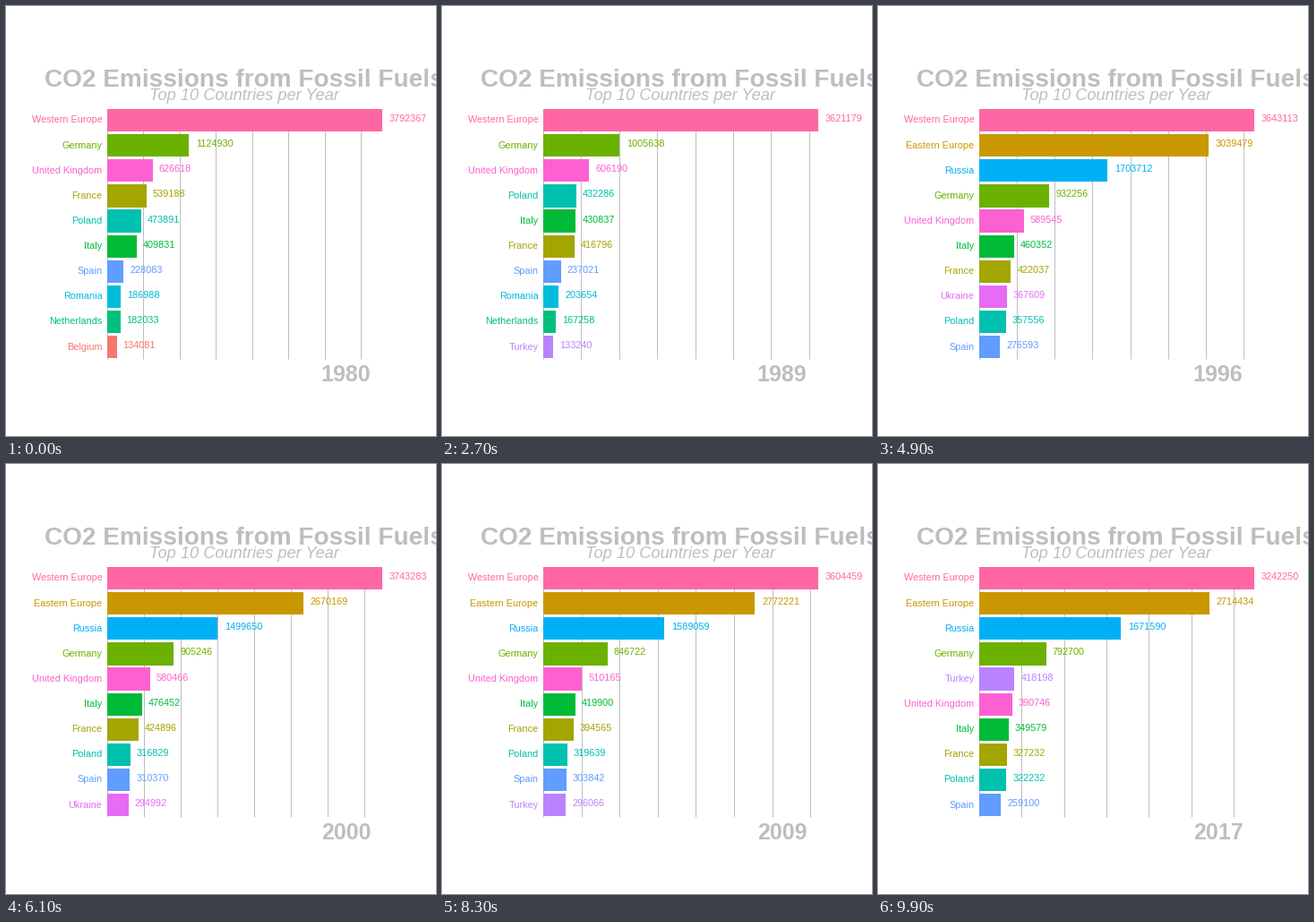
Recreate the animation shown at these times as a matplotlib script. Size 480 px wide and 480 px high, loop 10000 ms.

```python
import matplotlib.pyplot as plt
import numpy as np
from matplotlib.animation import FuncAnimation
from matplotlib.patches import Rectangle

SIZE, FRAMES, SHOWN = 480, 100, 10
LEFT, BAR_SPAN = 112.9, 307
TOP, PITCH, HALF = 127.52, 28.13, 12.65
GREY, LABEL = "#bebebe", 10.9
LEADER = "Western Europe"

# Turning points of each curve; a country joins in the first year it has
KEYS = {
    "Western Europe": {1980: 3792367, 1992.67: 3551373, 2005: 3860149,
                       2012.5: 3380730, 2017: 3242250},
    "Eastern Europe": {1992: 3440000, 2000.33: 2670075, 2005: 2801114, 2017: 2714434},
    "Russia": {1992: 1925000, 2000.33: 1499616, 2017: 1671590},
    "Germany": {1980: 1124930, 1992.67: 956994, 2017: 792700},
    "United Kingdom": {1980: 626618, 2005: 569874, 2017: 390746},
    "France": {1980: 539188, 1989: 416796, 2005: 428232, 2017: 327232},
    "Poland": {1980: 473891, 1989: 432286, 2000.33: 316828, 2017: 322232},
    "Italy": {1980: 409831, 1989: 430837, 2005: 495234, 2012: 363400, 2017: 349579},
    "Spain": {1980: 228083, 1992: 240000, 2001: 316000, 2005: 368964,
              2012: 255000, 2017: 259100},
    "Ukraine": {1992: 560000, 1994: 410000, 2000.33: 295000, 2012.5: 265020, 2017: 200000},
    "Turkey": {1980: 76000, 2005: 235000, 2017: 418198},
    "Romania": {1980: 186988, 1989: 203654, 1992: 125000},
    "Netherlands": {1980: 182033, 1989: 167258},
    "Belgium": {1980: 134081, 1989: 110000},
    "Czech Republic": {1990: 166000, 1992: 140000},
}


def hue_color(hue, chroma=100, light=65):
    """Polar LUV colour as sRGB."""
    angle = np.radians(hue)
    u = chroma * np.cos(angle) / (13 * light) + 0.1978
    v = chroma * np.sin(angle) / (13 * light) + 0.4683
    y = ((light + 16) / 116) ** 3
    x, z = y * 9 * u / (4 * v), y * (12 - 3 * u - 20 * v) / (4 * v)
    linear = np.clip([3.2406 * x - 1.5372 * y - 0.4986 * z,
                      -0.9689 * x + 1.8758 * y + 0.0415 * z,
                      0.0557 * x - 0.2040 * y + 1.0570 * z], 0, 1)
    return tuple(np.where(linear <= 0.0031308, 12.92 * linear,
                          np.clip(1.055 * linear ** (1 / 2.4) - 0.055, 0, 1)))


COLORS = {name: hue_color(15 + 360 * i / len(KEYS)) for i, name in enumerate(sorted(KEYS))}


def value(name, time):
    keys = KEYS[name]
    return np.interp(time, list(keys), list(keys.values()))


def ranking(year):
    known = [name for name in KEYS if year >= min(KEYS[name])]
    known.sort(key=lambda name: -value(name, year))
    return {name: i for i, name in enumerate(known[:SHOWN])}


RANKS = {year: ranking(year) for year in range(1980, 2018)}


def clock(frame):
    """Year and the share of the way to the next one."""
    if frame < 75:
        return 1980 + frame // 3, frame % 3 / 3
    return 2005 + (frame - 75) // 2, (frame - 75) % 2 / 2


fig = plt.figure(figsize=(SIZE / 72, SIZE / 72), dpi=72, facecolor="white")
ax = fig.add_axes([0, 0, 1, 1])


def write(x, y, text, size, color=GREY, **style):
    ax.text(x, y, text, fontsize=size, color=color, va="baseline",
            fontfamily="Liberation Sans", **style)


def draw_grid(scale):
    bottom = TOP + PITCH * (SHOWN - 1) + HALF + 0.6
    for step in np.arange(0, BAR_SPAN / scale, 500000):
        x = int(LEFT - 0.4 + step * scale) + 0.5
        ax.plot([x, x], [TOP - HALF, bottom], color=GREY, lw=1,
                solid_capstyle="butt", zorder=1)


def draw_bar(name, rank, amount, scale):
    y, width, color = TOP + PITCH * rank, amount * scale, COLORS[name]
    ax.add_patch(Rectangle((LEFT, y - HALF), width, 2 * HALF, lw=0,
                           color=color, antialiased=False, zorder=2))
    label = str(round(amount))
    write(LEFT - 5.4, y + 2.9, name, LABEL, color, ha="right")
    write(LEFT + width + 1.15 * len(label), y + 1.5, label, LABEL, color)


def draw(frame):
    ax.clear()
    ax.set(xlim=(0, SIZE), ylim=(SIZE, 0))
    ax.axis("off")
    year, part = clock(frame)
    scale = BAR_SPAN / value(LEADER, year + part)
    draw_grid(scale)

    here = RANKS[year]
    following = RANKS[year + 1] if part else here
    for name, rank in here.items():
        if name in following:
            rank += (following[name] - rank) * part
            draw_bar(name, rank, value(name, year + part), scale)

    write(42.6, 90, "CO2 Emissions from Fossil Fuels", 28, weight="bold", clip_on=True)
    write(266.5, 105, "Top 10 Countries per Year", 18.3, style="italic", ha="center")
    write(379.6, 419, str(year), 25, weight="bold", ha="center")


anim = FuncAnimation(fig, draw, frames=FRAMES, interval=100,
                     init_func=lambda: None, repeat=True, repeat_delay=0)
plt.show()
```
